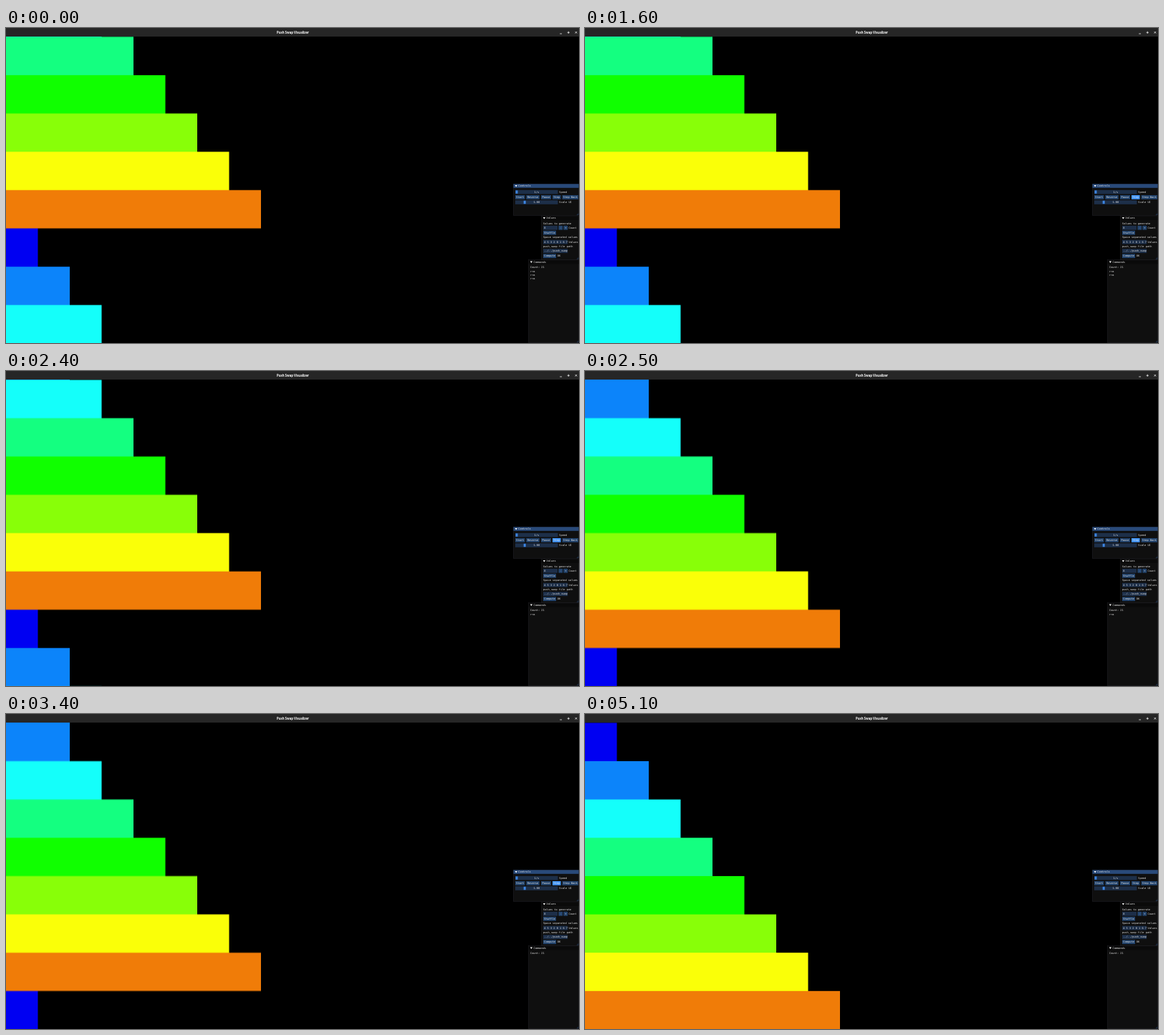
An HTML page that plays this animation: 800 px wide and 441 px high, repeating every 5.2 s.

```html
<!DOCTYPE html>
<html lang="en">
<head>
<meta charset="utf-8">
<title>Push Swap Visualizer</title>
<style>
  html, body { margin: 0; width: 100%; height: 100%; overflow: hidden; background: #000; }
  svg { display: block; width: 100vw; height: 100vh; }
  text { font: 3.63px "DejaVu Sans Mono", monospace; fill: #e4e4e4; white-space: pre; }
  .title { font: 700 4.3px "Open Sans", sans-serif; fill: #fff; }
  .mid { text-anchor: middle; }
  .mark { fill: none; stroke: #eee; stroke-width: .8; }

  /* Additive blending keeps shared fractional edges free of dark seams. */
  #bars rect { mix-blend-mode: plus-lighter; }

  #bars, #step, .cmd { animation: 5200ms step-end infinite; }
  #bars { animation-name: rotate; }
  #step { animation-name: press; }
  .cmd1 { animation-name: pop1; }
  .cmd2 { animation-name: pop2; }
  .cmd3 { animation-name: pop3; }

  /* 100 ms = 1.9231% */
  @keyframes rotate {
    0% { transform: translateY(-160.89px); }
    32.6% { transform: translateY(-107.26px); }
    48% { transform: translateY(-53.63px); }
    67.2%, 100% { transform: translateY(0); }
  }
  @keyframes press {
    0% { fill: #23446d; }
    19.1% { fill: #4296fa; }
    28.7% { fill: #0f87fa; }
    30.7% { fill: #4296fa; }
    44.1% { fill: #0f87fa; }
    46% { fill: #4296fa; }
    63.3% { fill: #0f87fa; }
    65.3% { fill: #4296fa; }
    90.3%, 100% { fill: #23446d; }
  }
  @keyframes pop3 { 0% { opacity: 1; } 30.7%, 100% { opacity: 0; } }
  @keyframes pop2 { 0% { opacity: 1; } 46%, 100% { opacity: 0; } }
  @keyframes pop1 { 0% { opacity: 1; } 65.3%, 100% { opacity: 0; } }
</style>
</head>
<body>
<svg id="stage" viewBox="0 0 800 441" preserveAspectRatio="none"></svg>
<script>
const BUTTON = '#23446d', FIELD = '#1d2f49', GRAB = '#3d85e0';
const TOP = 12.4, ROW = 53.63, UNIT = 44.5;
const COLORS = ['#0000f2', '#0c84fa', '#14fffa', '#14ff80',
                '#10ff00', '#88ff08', '#faff08', '#f07c08'];

const rect = (x, y, w, h, fill, extra = '') =>
  `<rect x="${x}" y="${y}" width="${w}" height="${h}" fill="${fill}" ${extra}/>`;

// y is the vertical middle of the line
const text = (x, y, str, cls = '') =>
  `<text x="${x}" y="${y + 1.2}" class="${cls}">${str}</text>`;

const button = (x, y, w, label, extra = '') =>
  rect(x, y, w, 5.8, BUTTON, extra) + text(x + w / 2, y + 2.9, label, 'mid');

const field = (x, y, w, str) =>
  rect(x, y, w, 5.8, FIELD) + text(x + 1.2, y + 2.9, str);

const slider = (y, grabX, value, label) =>
  rect(711, y, 59.5, 5.6, FIELD) + rect(grabX, y + .6, 3, 4.4, GRAB) +
  text(740.8, y + 2.8, value, 'mid') + text(772.3, y + 2.8, label);

const panel = (x, y, w, h, label, titleFill) =>
  rect(x, y, w, h, '#0f0f0f', 'stroke="#2a2a30" stroke-width=".4"') +
  rect(x + .2, y + .2, w - .4, 5.4, titleFill) +
  `<path d="M${x + 2.3} ${y + 1.7}h3.2l-1.6 2.6z" fill="#fff"/>` +
  text(x + 7, y + 2.8, label) +
  `<path d="M${x + w - .5} ${y + h - 3.5}v3h-3z" fill="#1c2c42"/>`;

const bars = [...COLORS, ...COLORS.slice(0, 3)].map((color, i) =>
  rect(0, TOP + i * ROW, UNIT * (i % 8 + 1), ROW, color)).join('');

const chart =
  `<clipPath id="view">${rect(0, TOP, 800, 441 - TOP, '#fff')}</clipPath>` +
  `<g clip-path="url(#view)"><g id="bars">${bars}</g></g>`;

const titleBar =
  rect(0, 0, 800, 12, '#262626') +
  text(400.5, 6.6, 'Push Swap Visualizer', 'title mid') +
  `<path class="mark" d="M773.3 8h2.8M783.7 6.3h3.2M785.3 4.7v3.2M794.6 5l2.6 2.6M797.2 5l-2.6 2.6"/>`;

const controls =
  panel(708.3, 218.2, 91.5, 44.2, 'Controls', '#294a7a') +
  slider(226.8, 711.5, '1/s', 'Speed') +
  button(711, 234, 13.4, 'Start') +
  button(726.3, 234, 18.5, 'Reverse') +
  button(747, 234, 14, 'Pause') +
  button(763, 234, 11.6, 'Step', 'id="step"') +
  button(776.6, 234, 22.4, 'Step Back') +
  slider(241.2, 722.7, '1.00', 'Scale UI');

const values =
  panel(747.5, 263.2, 52.3, 61, 'Values', '#0a0a0a') +
  text(750, 273.4, 'Values to generate') +
  field(750, 276.8, 20, '8') +
  button(771.4, 276.8, 5.8, '-') +
  button(778.4, 276.8, 5.8, '+') +
  text(785.5, 279.7, 'Count') +
  button(750, 283.8, 18, 'Shuffle') +
  text(750, 293.2, 'Space separated values') +
  field(750, 296.7, 34.2, '4 5 3 2 0 1 6 7') +
  text(785.5, 299.6, 'Values') +
  text(750, 305.9, 'push_swap file path') +
  field(750, 309.2, 34.2, '../../push_swap') +
  button(750, 316.3, 18, 'Compute') +
  text(769.8, 319.2, 'OK');

const commands =
  panel(729.5, 324.7, 70.3, 116, 'Commands', '#0a0a0a') +
  text(732, 335.2, 'Count: 21') +
  [1, 2, 3].map(n => text(732, 335.3 + n * 5.3, 'rra', `cmd cmd${n}`)).join('');

document.getElementById('stage').innerHTML =
  rect(0, 0, 800, 441, '#000') + chart + titleBar + commands + values + controls;
</script>
</body>
</html>
```
